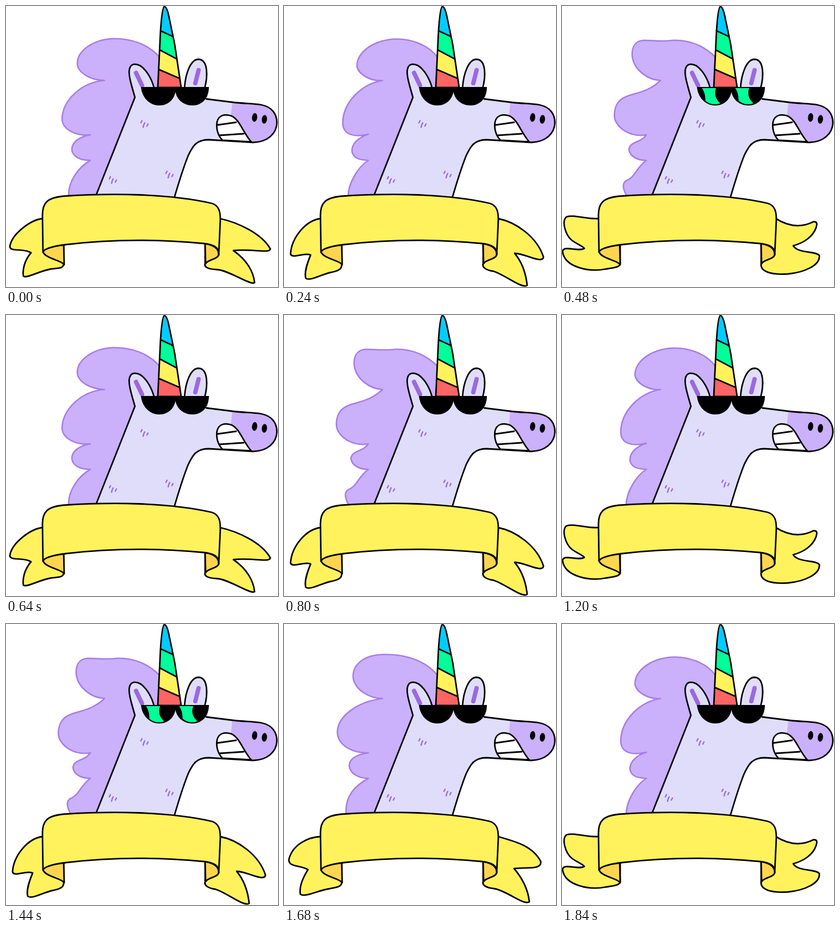
An HTML page that plays this animation: 500x517 px, repeating every 1.92 s.

```html
<!DOCTYPE html>
<html lang="en">
<head>
<meta charset="utf-8">
<title>Cool unicorn</title>
<style>
html, body { margin: 0; width: 100%; height: 100%; overflow: hidden; background: #fff; }
svg { display: block; width: 500px; height: 517px; }
.ink { stroke: #000; stroke-width: 2.8; stroke-linejoin: round; stroke-linecap: round; }
.gold { fill: #fff25c; }
.fold { fill: #ffd54e; }
.skin { fill: #e0ddfa; }
.line { fill: none; }
.mark { fill: none; stroke: #9a69e0; stroke-linecap: round; }
</style>
</head>
<body>
<svg viewBox="0 0 500 517">
  <defs>
    <clipPath id="lenses">
      <path d="M253 151H309A28 30 0 0 1 253 151ZM315 151H369A27 30 0 0 1 315 151Z"/>
    </clipPath>
    <clipPath id="horn">
      <path id="hornShape" d="M279 150L284 46Q287 2 291 1Q296 1 300 22L310 70L322 150Z"/>
    </clipPath>
    <path id="freckles" d="M-2 -5l-2 4M3 -1l-2 4M9 1l-2 4M1 4l-1 3"/>
    <path id="glint" d="M256 149Q267 164 262 184H297Q275 169 284 149Z"/>
  </defs>

  <path id="hair" fill="#cbb0fb" stroke="#a67de9" stroke-width="2.6" stroke-linejoin="round"/>

  <!-- head -->
  <path class="ink skin" d="M328 152C330 122 340 98 354 98C372 99 371 130 365 152Z"/>
  <path class="skin" d="M164 352L237 168C232 150 224 126 227 116C229 106 238 105 247 110C259 118 268 135 272 150H368L372 171L416 177C440 180 455 179 470 182C490 186 498 200 498 215C497 236 480 250 455 251L372 246C350 246 343 258 335 275C325 300 316 330 309 354Z"/>
  <path fill="#cbb0fb" d="M416 177C440 180 455 179 470 182C490 186 498 200 498 215C497 236 480 250 455 251L413 206Z"/>
  <path class="ink line" d="M164 352L237 168C232 150 224 126 227 116C229 106 238 105 247 110C259 118 268 135 272 150M368 171L416 177C440 180 455 179 470 182C490 186 498 200 498 215C497 236 480 250 455 251L372 246C350 246 343 258 335 275C325 300 316 330 309 354"/>
  <path class="mark" stroke-width="8" d="M239 123L250 146M354 118L348 142"/>
  <g class="mark" stroke-width="2.4">
    <use href="#freckles" x="252" y="216"/>
    <use href="#freckles" x="194" y="319"/>
    <use href="#freckles" x="298" y="309"/>
  </g>
  <path class="ink" fill="#fff" d="M388 213C391 201 402 198 414 202C430 209 436 234 451 250L398 247C389 238 386 225 388 213Z"/>
  <path class="ink line" d="M388 219L423 214M392 238L437 235"/>
  <ellipse cx="457" cy="205" rx="4.800" ry="8" transform="rotate(6 457 205)"/>
  <ellipse cx="475" cy="208.500" rx="4.800" ry="8" transform="rotate(6 475 208.500)"/>

  <!-- horn -->
  <g clip-path="url(#horn)">
    <path fill="#00ccff" d="M270 0H330V70L270 39Z"/>
    <path fill="#00ff99" d="M270 39L330 67V107L270 74Z"/>
    <path fill="#fff25c" d="M270 74L330 106V142L270 112Z"/>
    <path fill="#ff6464" d="M270 112L330 138V152H270Z"/>
    <path class="ink line" d="M270 39L330 67M270 74L330 106M270 112L330 138"/>
  </g>
  <use href="#hornShape" class="ink line"/>

  <!-- glasses -->
  <path d="M248 149H373C373 170 360 183 343 183C326 183 314 172 311.500 158C309 172 298 183 282 183C264 183 250 169 248 149Z"/>
  <g clip-path="url(#lenses)">
    <g id="shine" fill="#00ff99">
      <use href="#glint"/>
      <use href="#glint" x="61"/>
    </g>
  </g>

  <!-- ribbon -->
  <path id="tails" class="ink gold"/>
  <path class="ink fold" d="M68 452C70 446 90 441 106 439L107 476C103 468 72 465 68 452ZM391 458C392 445 380 440 366 437L367 474C371 466 388 467 391 458Z"/>
  <path class="ink gold" d="M68 453L67 385C67 362 76 353 104 350C195 344 300 345 378 363C391 367 394 377 394 393L391 458C392 444 382 439 364 437C270 428 185 430 110 439C86 442 70 446 68 453Z"/>
</svg>
<script>
const el = id => document.getElementById(id);
const STEP = 80, COUNT = 24;

const hairs = [
  "C262 70 228 59 196 60C160 62 131 82 131 106C132 124 158 137 181 137C140 140 104 172 103 208C104 228 130 240 155 237C136 240 121 250 121 264C122 278 138 284 155 284C134 296 114 322 115 350",
  "C258 66 222 56 185 56C148 56 126 74 127 98C130 122 158 137 181 137C130 144 98 172 98 200C100 226 130 238 155 237C134 240 119 248 120 262C122 276 138 284 155 284C130 298 112 316 114 350",
  "C262 74 235 62 205 63C182 66 166 63 150 63C134 64 128 76 129 92C132 118 158 136 181 137C152 165 122 158 105 175C96 185 94 203 99 213C110 232 132 241 155 237C146 252 125 248 123 264C125 278 140 284 155 284C134 300 136 314 117 322C109 328 114 340 119 350",
  "C264 70 230 59 200 61C164 64 135 84 134 110C136 126 160 139 181 137C144 143 108 176 108 216C109 240 134 241 155 236C136 242 124 254 125 268C128 282 142 283 155 284C136 296 118 326 118 350"
].map(lobes => "M282 94" + lobes + "L168 350L237 168L280 150Z");

// Left and right ends of the ribbon: out, down, in, up
const tails = [
  ["C45 393 10 420 7 443C9 453 32 445 46 454C34 468 30 485 32 497C37 502 60 488 82 484C97 482 106 483 106 474",
   "C425 398 470 418 486 447C484 456 450 446 418 450C444 468 455 490 457 509C450 515 410 486 388 485C370 484 364 480 366 474"],
  ["C40 394 14 426 12 456C15 466 35 453 49 458C42 475 37 490 40 501C48 507 70 493 87 490C101 487 107 484 106 474",
   "C425 397 465 424 477 462C475 475 445 456 424 455C439 473 445 495 447 514C438 521 405 494 385 488C370 486 364 480 366 474"],
  ["C45 392 16 405 9 433C8 448 30 443 44 452C34 468 28 485 30 497C38 504 62 490 84 487C99 484 107 483 106 474",
   "C425 400 457 408 472 437C474 453 445 447 423 450C440 470 449 492 451 511C442 519 408 490 387 487C370 485 364 480 366 474"],
  ["C45 393 22 383 8 388C-1 396 6 421 18 431C30 440 38 441 41 446C30 453 2 439 1 452C5 481 50 490 80 484C100 481 106 480 107 474",
   "C418 407 442 407 462 397C470 396 469 402 467 408C461 425 444 436 425 441C434 456 466 450 473 459C475 477 446 490 415 493C385 495 364 489 366 474"]
].map(([left, right]) =>
  "M68 391" + left + "V440H70ZM393 391" + right + "V437H388Z");

function draw(now) {
  const k = Math.floor(now / STEP) % COUNT;
  el("hair").setAttribute("d", hairs[k % 4]);
  el("tails").setAttribute("d", tails[(k >> 1) % 4]);
  const sweep = k % 12 - 6;
  el("shine").setAttribute("visibility", Math.abs(sweep) < 2 ? "visible" : "hidden");
  el("shine").setAttribute("transform", `translate(${sweep * 22} 0)`);
}

const start = performance.now();
function tick() {
  draw(performance.now() - start);
  requestAnimationFrame(tick);
}
tick();
</script>
</body>
</html>
```
